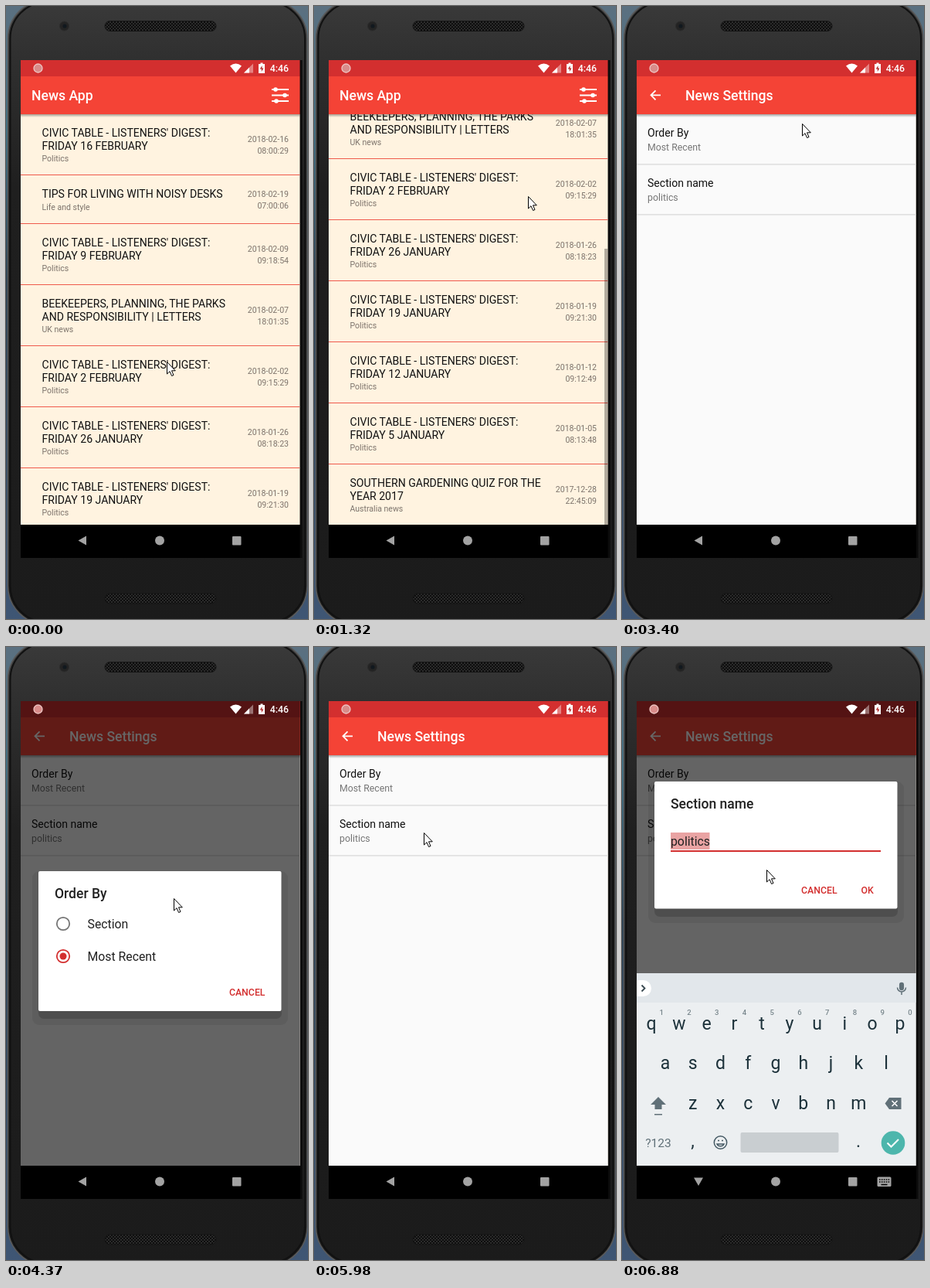
Write an HTML page that moves like this. It is 391x793 px and loops after 8000 ms.

```html
<!DOCTYPE html>
<html lang="en">
<head>
<meta charset="utf-8">
<title>News App</title>
<style>
  html, body { margin: 0; width: 100%; height: 100%; overflow: hidden; background: #1c1c1c; }
  svg { display: block; width: 391px; height: 793px; font-family: Roboto, sans-serif; }
  .end { text-anchor: end; }
  .mid { text-anchor: middle; }
  .bar { font-size: 17.6px; font-weight: 500; fill: #fff; }
  .item { font-size: 14.05px; fill: #111; }
  .small { font-size: 10.54px; fill: #7c736b; }
  .pref { font-size: 12.3px; fill: #757575; }
  .head { font-size: 17.55px; font-weight: 500; fill: #212121; }
  .option { font-size: 15.8px; fill: #212121; }
  .button { font-size: 12.3px; font-weight: 500; fill: #d32f2f; }
  .key { font-size: 23px; fill: #1c313a; }
  .hint { font-size: 9.5px; font-weight: 500; fill: #78868c; }
</style>
</head>
<body>
<svg viewBox="0 0 391 793">
  <defs>
    <linearGradient id="desk" x2="0" y2="1">
      <stop stop-color="#5b7080"/><stop offset=".2" stop-color="#3f7186"/>
      <stop offset=".45" stop-color="#2c4254"/><stop offset="1" stop-color="#3f5674"/>
    </linearGradient>
    <linearGradient id="body" x2="0" y2="1">
      <stop stop-color="#3a3a3a"/><stop offset=".09" stop-color="#303030"/>
      <stop offset=".3" stop-color="#1f1f1f"/><stop offset="1" stop-color="#1b1b1b"/>
    </linearGradient>
    <linearGradient id="shade" x2="0" y2="1">
      <stop stop-opacity=".35"/><stop offset="1" stop-opacity="0"/>
    </linearGradient>
    <pattern id="mesh" width="4" height="4" patternUnits="userSpaceOnUse">
      <rect width="4" height="4" fill="#2b2b2b"/>
      <circle cx="1" cy="1" r="1.1" fill="#080808"/><circle cx="3" cy="3" r="1.1" fill="#080808"/>
    </pattern>
    <clipPath id="screen"><path d="M19 70H380.5V714H19Z"/></clipPath>
    <clipPath id="content"><path d="M19 140H380.5V671H19Z"/></clipPath>
    <clipPath id="prefRow"><path d="M19 205H380.5V269.5H19Z"/></clipPath>
  </defs>

  <rect width="391" height="793" fill="url(#desk)"/>
  <rect x="2.5" y="-8" width="387.5" height="808" rx="50" fill="url(#body)" stroke="#5a5a5a" stroke-width="1.5"/>
  <rect x="5.5" y="-5" width="381.5" height="802" rx="47" fill="none" stroke="#111" stroke-width="2"/>
  <circle cx="75.5" cy="26" r="6" fill="#232323" stroke="#2c2c2c"/>
  <circle cx="76" cy="26" r="2.5" fill="#11181e"/>
  <g fill="url(#mesh)" stroke="#151515">
    <rect x="128" y="19.5" width="144" height="13" rx="6.5"/>
    <rect x="128" y="760" width="144" height="13" rx="6.5"/>
  </g>
  <path d="M380 70h3.5v644h-3.5z" fill="#0b0b0b"/>

  <g clip-path="url(#screen)">
    <g id="listPage">
      <path d="M19 140H381V671H19Z" fill="#fff3e0"/>
      <g clip-path="url(#content)">
        <g id="rows"></g>
        <rect id="thumb" x="376" width="4.5" height="357"/>
      </g>
      <g class="chrome"></g>
      <text class="bar" x="33" y="122.3">News App</text>
      <path d="M344 108h22M344 115.5h22M344 123h22" stroke="#fff" stroke-width="2.2"/>
      <g fill="#fff"><circle cx="349" cy="108" r="2.8"/><circle cx="361" cy="115.5" r="2.8"/><circle cx="350" cy="123" r="2.8"/></g>
    </g>

    <g id="settingsPage">
      <path d="M19 140H381V671H19Z" fill="#fafafa"/>
      <path d="M19 204.8h362M19 269.8h362" stroke="#d9d9d9" stroke-width="1.2"/>
      <g clip-path="url(#prefRow)"><circle id="ripple" cx="158.5" cy="238"/></g>
      <g class="chrome"></g>
      <path d="M50 115.3H38M43.5 109.3l-6 6 6 6" fill="none" stroke="#fff" stroke-width="1.8"/>
      <text class="bar" x="82" y="122.3">News Settings</text>
      <text class="item" x="33" y="169">Order By</text><text class="pref" x="33" y="186.5">Most Recent</text>
      <text class="item" x="33" y="234">Section name</text><text class="pref" x="33" y="251.5">politics</text>
    </g>

    <rect id="dim" x="19" y="70" width="362" height="601"/>

    <g id="orderDialog">
      <rect x="34" y="290" width="331" height="199" rx="9" opacity=".07"/>
      <rect x="42" y="293" width="315" height="188" rx="7" opacity=".16"/>
      <rect x="42" y="290" width="314.5" height="181" rx="2" fill="#fff"/>
      <rect id="press" x="42" y="379" width="314.5" height="42.5"/>
      <text class="head" x="63" y="325">Order By</text>
      <g fill="none" stroke-width="1.8">
        <circle cx="74" cy="358" r="8.2" stroke="#757575"/><circle cx="74" cy="400" r="8.2" stroke="#d32f2f"/>
      </g>
      <circle cx="74" cy="400" r="4.5" fill="#d32f2f"/>
      <text class="option" x="105.5" y="364">Section</text>
      <text class="option" x="105.5" y="406">Most Recent</text>
      <text class="button end" x="335.5" y="451">CANCEL</text>
    </g>

    <g id="nameDialog">
      <rect x="34" y="298" width="331" height="183" rx="9" opacity=".07"/>
      <rect x="42" y="301" width="315" height="172" rx="7" opacity=".16"/>
      <rect x="42" y="298" width="314.5" height="164.5" rx="2" fill="#fff"/>
      <text class="head" x="63" y="333">Section name</text>
      <path d="M63 364h50.5v22H63z" fill="#e9a3a3"/>
      <path d="M63 388h272" stroke="#d32f2f" stroke-width="1.8"/>
      <text class="option" x="63" y="381.3">politics</text>
      <text class="button" x="232" y="442.5">CANCEL</text><text class="button" x="309.5" y="442.5">OK</text>
    </g>

    <g id="keyboard">
      <path d="M19 422H381V671H19Z" fill="#eceff1"/>
      <path d="M19 422H381V460H19Z" fill="#e2e7eb"/>
      <path d="M19 671H381V714H19Z"/>
      <path d="M19 431h8.5a10 10 0 0 1 0 21H19z" fill="#fff"/>
      <path d="M25.5 437.5l4 4-4 4" fill="none" stroke="#37474f" stroke-width="1.8"/>
      <g fill="none" stroke="#607078" stroke-width="1.5">
        <rect x="359.7" y="434.5" width="4.6" height="9" rx="2.3" fill="#607078"/>
        <path d="M356.5 440.5a5.5 5.5 0 0 0 11 0M362 446v4"/>
      </g>
      <g id="keys"></g>
      <path d="M47 582l10 10h-5.5v6h-9v-6H37zM42 604h10v1.5H42z" fill="#607078"/>
      <path d="M340.5 590.5l5.5-7.5h15.5v15H346z" fill="#607078"/>
      <path d="M349.5 587l7 7M356.5 587l-7 7" stroke="#fff" stroke-width="1.5"/>
      <text class="mid" x="47" y="647" font-size="15.5" fill="#607078">?123</text>
      <text class="key mid" x="91.5" y="647">,</text><text class="key mid" x="306" y="647">.</text>
      <g fill="none" stroke="#455a64" stroke-width="1.5">
        <circle cx="127.5" cy="641" r="8.2"/><path d="M123 643a5 5 0 0 0 9 0zM124 638.5h2M129 638.5h2"/>
      </g>
      <rect x="153.5" y="628" width="127" height="26" rx="2" fill="#c9ced1"/>
      <circle cx="351" cy="641.5" r="15.3" fill="#4db6ac"/>
      <path d="M343.5 641.5l5 5 9.5-9.5" fill="none" stroke="#fff" stroke-width="2"/>
    </g>

    <circle cx="41.5" cy="80.5" r="5.5" fill="#d98c8a" stroke="#eec5c3" stroke-width="1.3"/>
    <g fill="#fff">
      <path d="M290 77.5Q297.5 71.5 305 77.5L297.5 86.5Z"/>
      <path d="M320 74.5v12h-12z" opacity=".4"/><path d="M315 79.5v7h-7z"/>
      <path d="M329.5 73.5h3v1.5h2.5v12h-8v-12h2.5z"/>
    </g>
    <path d="M331.5 77l-2.7 4.5h2v3.5l2.7-4.5h-2z" fill="#b32626"/>
    <text x="366" y="85" class="end" font-size="12.3" font-weight="500" fill="#fff">4:46</text>

    <g fill="#a3a3a3">
      <path id="back" d="M93.5 691.5L104 685.5v12z"/>
      <circle cx="199" cy="691.5" r="6"/><rect x="293" y="686" width="11.5" height="11.5" rx="1"/>
      <g id="imeIcon">
        <rect x="330.5" y="685.5" width="18" height="12.5" rx="1.5"/>
        <path d="M333 689h13.5M333 692h13.5" stroke="#000" stroke-width="1.6" stroke-dasharray="1.6 1.3"/>
        <path d="M335.5 695.5h8" stroke="#000" stroke-width="1.5"/>
      </g>
    </g>
  </g>
  <path id="cursor" d="M.5.5V16L4 12.7 6.6 18.5 9 17.5 6.5 11.8H11.3Z" fill="#fff" stroke="#000"/>
</svg>

<script>
const $ = id => document.getElementById(id);
const LOOP = 8000, TICK = 120, MAX_SCROLL = 242;

const weekly = (day, date, time) => [["CIVIC TABLE - LISTENERS' DIGEST:", "FRIDAY " + day], "Politics", date, time];
const articles = [
  weekly("16 FEBRUARY", "2018-02-16", "08:00:29"),
  [["TIPS FOR LIVING WITH NOISY DESKS"], "Life and style", "2018-02-19", "07:00:06"],
  weekly("9 FEBRUARY", "2018-02-09", "09:18:54"),
  [["BEEKEEPERS, PLANNING, THE PARKS", "AND RESPONSIBILITY | LETTERS"], "UK news", "2018-02-07", "18:01:35"],
  weekly("2 FEBRUARY", "2018-02-02", "09:15:29"),
  weekly("26 JANUARY", "2018-01-26", "08:18:23"),
  weekly("19 JANUARY", "2018-01-19", "09:21:30"),
  weekly("12 JANUARY", "2018-01-12", "09:12:49"),
  weekly("5 JANUARY", "2018-01-05", "08:13:48"),
  [["SOUTHERN GARDENING QUIZ FOR THE", "YEAR 2017"], "Australia news", "2017-12-28", "22:45:09"]
];

const text = (cls, x, y, s) => `<text class="${cls}" x="${x}" y="${y}">${s}</text>`;

let nextTop = 140;
$("rows").innerHTML = articles.map(([title, section, date, time]) => {
  const y = nextTop, extra = (title.length - 1) * 16;
  nextTop += 63 + extra;
  return title.map((line, i) => text("item", 46.5, y + 29 + i * 16.5, line)).join("") +
    text("small", 46.5, y + 45 + extra, section) +
    text("small end", 366, y + 28 + extra / 2, date) +
    text("small end", 366, y + 42.5 + extra / 2, time) +
    `<path d="M19 ${nextTop - .5}h362" stroke="#ef5a4c" stroke-width="1.2"/>`;
}).join("");

$("keys").innerHTML = ["qwertyuiop", "asdfghjkl", "zxcvbnm"].map((row, r) => [...row].map((c, i) => {
  const x = 199 + (i - (row.length - 1) / 2) * 35.75;
  return text("key mid", x, 494.5 + r * 51.5, c) + (r ? "" : text("hint mid", x + 13, 476, (i + 1) % 10));
}).join("")).join("");

for (const g of document.querySelectorAll(".chrome")) g.innerHTML =
  `<path d="M19 70H381V91H19Z" fill="#d32f2f"/><path d="M19 91H381V140H19Z" fill="#f44336"/>
   <path d="M19 140H381V144H19Z" fill="url(#shade)"/><path d="M19 671H381V714H19Z"/>`;

// Progress from 0 to 1 in equal jumps, one per screen refresh, the first at `start`.
function ramp(t, start, end = start) {
  if (t < start) return 0;
  const jumps = Math.round((end - start) / TICK) + 1;
  return Math.min(1, (Math.floor((t - start) / TICK) + 1) / jumps);
}
const easeOut = p => 1 - (1 - p) ** 2;

// Pointer moves: start, end, destination.
const moves = [
  [150, 390, 249, 514], [540, 1200, 277, 246], [1470, 2010, 320, 139], [2160, 2280, 347, 124],
  [2860, 3250, 233, 152], [4100, 4220, 253, 282], [4370, 4370, 217, 325], [4490, 4610, 178, 374],
  [4760, 5040, 175, 400], [5590, 5590, 167, 324], [5740, 5980, 142, 240], [6640, 6880, 187, 288]
];
const pointerAt = t => moves.reduce(([x, y], [start, end, toX, toY]) => {
  const p = ramp(t, start, end);
  return [x + (toX - x) * p, y + (toY - y) * p];
}, [208, 460]);

function place(id, x, y, opacity = 1) {
  $(id).setAttribute("transform", `translate(${x} ${y})`);
  $(id).setAttribute("opacity", opacity);
}

function draw(now) {
  const t = now % LOOP;
  const drag = Math.min(1, ramp(t, 540, 1200) * 1.1);
  const page = easeOut(ramp(t, 2740, 2980));
  const orderOpen = ramp(t, 3800, 3950), orderClose = ramp(t, 5040, 5320);
  const nameOpen = ramp(t, 6250, 6370), typing = easeOut(ramp(t, 6640, 6880));

  place("cursor", ...pointerAt(t));
  place("rows", 0, -MAX_SCROLL * drag);
  place("thumb", 0, 140 + 174 * drag, .3 * (ramp(t, 540) - ramp(t, 1770, 2010)));
  place("settingsPage", 0, 70 * (1 - page), page);
  place("dim", 0, 0, .6 * (orderOpen * (1 - orderClose ** 4) + nameOpen));
  place("orderDialog", 0, 0, orderOpen * (1 - orderClose ** 1.5));
  place("press", 0, 0, .06 * ramp(t, 5040));
  place("nameDialog", 0, -124 * typing, nameOpen);
  place("keyboard", 0, 88 * (1 - typing), typing);
  place("imeIcon", 0, 0, ramp(t, 6250));
  place("ripple", 0, 0, .07 * (1 - typing));
  $("ripple").setAttribute("r", 92 * nameOpen);
  $("back").setAttribute("transform", `rotate(${-90 * ramp(t, 6250)} 99 691.5)`);
  requestAnimationFrame(draw);
}
draw(performance.now());
</script>
</body>
</html>
```
